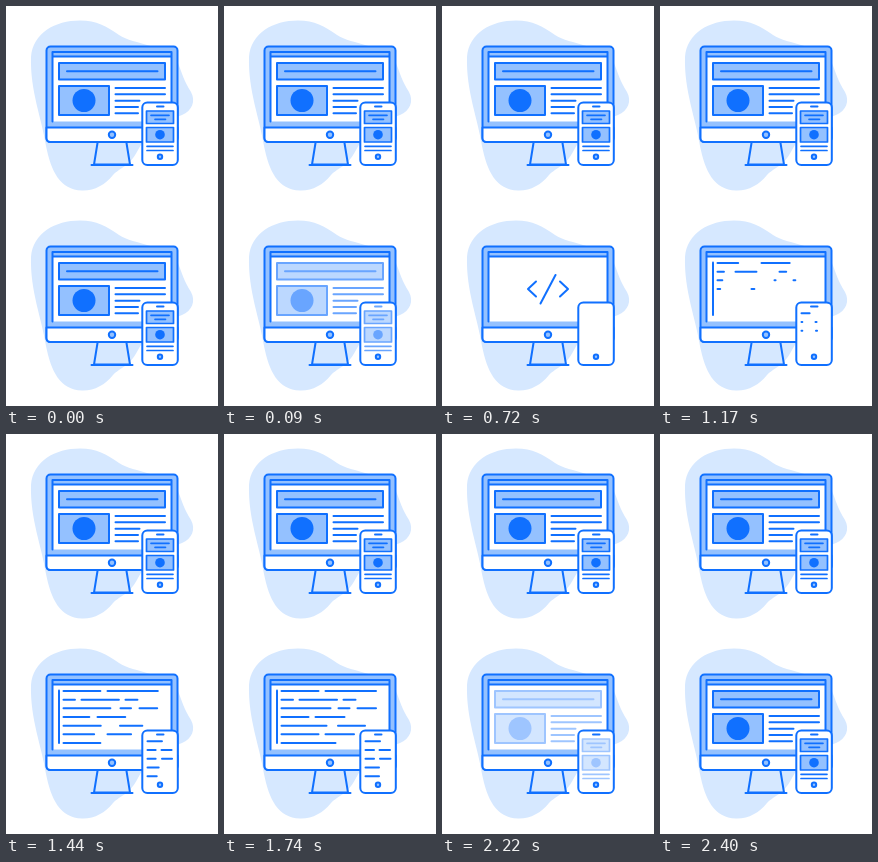
These frames come from a looping animation (212x400 px, 2.7 s). An HTML page:

```html
<!DOCTYPE html>
<html lang="en">
<head>
<meta charset="utf-8">
<title>Website build</title>
<style>
html, body { margin: 0; width: 100%; height: 100%; overflow: hidden; background: #fff; }
svg { display: block; width: 100%; height: 100%; }
.ink { fill: none; stroke: #1070ff; stroke-width: 2; stroke-linecap: round; stroke-linejoin: round; }
.pale { fill: #94c1ff; }
.white { fill: #fff; }
.mark { fill: #1070ff; }
.blob { fill: #d6e8ff; }
</style>
</head>
<body>
<svg viewBox="0 0 212 400" xmlns="http://www.w3.org/2000/svg">
  <defs>
    <g id="device">
      <path class="blob" d="M74 14.5C91 14.500 100 20 113 29C128 39 160 38 172 57C176 67 178 75 185 86C190 95 186 105 176 109C154 117 141 127 132 144C123 161 115 161 107 169C99 179 88 185 76 184.500C54 184 45 165 40 140C36 113 24 85 25 51C27 27 49 14.500 74 14.500Z"/>
      <path class="ink" style="fill:#d6e8ff" d="M91.500 137L88 158.500H124L120.500 137"/>
      <path class="ink" d="M85.500 159H126.500"/>
      <rect class="ink pale" x="40.500" y="40.500" width="131" height="95.500" rx="4"/>
      <path class="ink white" d="M40.500 121.500H171.500V132Q171.500 136 167.500 136H44.500Q40.500 136 40.500 132Z"/>
      <path class="white" d="M46.500 50H165.500V115.500H46.500Z"/>
      <path class="ink" d="M46.500 115.500V46H165.500V115.500M46.500 50.500H165.500"/>
      <circle class="ink pale" cx="106" cy="128.700" r="3.200"/>
      <rect class="ink white" x="136.300" y="96.500" width="35.500" height="62.500" rx="5"/>
      <circle class="ink pale" cx="154" cy="150.800" r="2.200"/>
    </g>
    <path id="notch" class="ink" d="M151 100.500H157.500"/>
    <g id="page">
      <g class="ink">
        <rect class="pale" x="53" y="57" width="106" height="16.500"/>
        <rect class="pale" x="53" y="80" width="50" height="29"/>
        <path d="M61 65.300H151.500M109.500 82H159M109.500 88.300H159M109.500 94.700H133.500M109.500 101H132M109.500 107.300H132"/>
        <g stroke-width="1.700">
          <rect class="pale" x="140.500" y="105" width="27" height="12.500"/>
          <rect class="pale" x="140.500" y="121.500" width="27" height="14.500"/>
          <path d="M145 109.300H163M149 113.300H159.500M141 140.300H167M141 144.500H167"/>
        </g>
      </g>
      <circle class="mark" cx="78" cy="94.500" r="11.500"/>
      <circle class="mark" cx="154" cy="128.700" r="4.800"/>
    </g>
  </defs>
  <use href="#device"/><use href="#notch"/><use href="#page"/>
  <g transform="translate(0 200)">
    <use href="#device"/>
    <use href="#notch" id="liveNotch"/>
    <use href="#page" id="livePage"/>
    <g class="ink" id="icon"></g>
    <g class="ink" id="code"></g>
  </g>
</svg>
<script>
const LOOP = 2700, STEP = 30;
const byId = id => document.getElementById(id);
const ramp = (t, from, to) => Math.min(1, Math.max(0, (t - from) / (to - from)));
const easeOut = p => 1 - (1 - p) ** 3;
const strokes = [];

function addStroke(parent, d, start, end, ease = p => p) {
  const el = document.createElementNS("http://www.w3.org/2000/svg", "path");
  el.setAttribute("d", d);
  el.setAttribute("pathLength", 1);
  byId(parent).append(el);
  strokes.push({ el, start, end, ease });
}

addStroke("icon", "M94 75.500L86 83L94 90.500", 210, 390);
addStroke("icon", "M98.500 97.500L113.500 69", 330, 540);
addStroke("icon", "M118 75.500L126 83L118 90.500", 510, 690);
addStroke("code", "M53 56.500V109", 1070, 1150);

// Each row lists start and end positions of its dashes.
const screenRows = [
  [57.5, 79 + 15.5, 101.5, 152], [57.5, 69, 75.5, 113, 119.5, 131.5],
  [57.5, 106.5, 114.5, 125.5, 133.5, 152], [57.5, 84.5, 91.5, 120.5],
  [57.5, 102.5, 114, 141], [57.5, 94.5, 101.5, 130], [57.5, 111.5]
];
const phoneRows = [
  [141.5, 156], [141.5, 150, 155.5, 166], [141.5, 150, 156, 166.5],
  [141.5, 155], [141.5, 155]
];

function addRows(rows, top, gap, starts) {
  rows.forEach((row, r) => {
    for (let i = 0; i < row.length; i += 2) {
      addStroke("code", `M${row[i]} ${top + r * gap}H${row[i + 1]}`, starts[r], starts[r] + 440, easeOut);
    }
  });
}
addRows(screenRows, 57, 8.67, [1065, 1065, 1155, 1155, 1245, 1245, 1300]);
addRows(phoneRows, 107.3, 8.75, [1065, 1155, 1155, 1245, 1300]);

function draw(time) {
  const t = Math.floor((time % LOOP) / STEP) * STEP;
  const fade = 1 - ramp(t, 0, 240);
  byId("livePage").style.opacity = fade + ramp(t, 2100, 2400);
  byId("liveNotch").style.opacity = fade + ramp(t, 1080, 1140);
  byId("icon").style.opacity = 1 - ramp(t, 720, 1080);
  byId("code").style.opacity = 1 - ramp(t, 1860, 2100);
  for (const { el, start, end, ease } of strokes) {
    const p = ease(ramp(t, start, end));
    el.style.visibility = p > 0 ? "visible" : "hidden";
    el.style.strokeDasharray = p < 1 ? `${p} 2` : "none";
  }
}

let origin;
function tick(now) {
  origin ??= now;
  draw(now - origin);
  requestAnimationFrame(tick);
}
draw(0);
requestAnimationFrame(tick);
</script>
</body>
</html>
```
